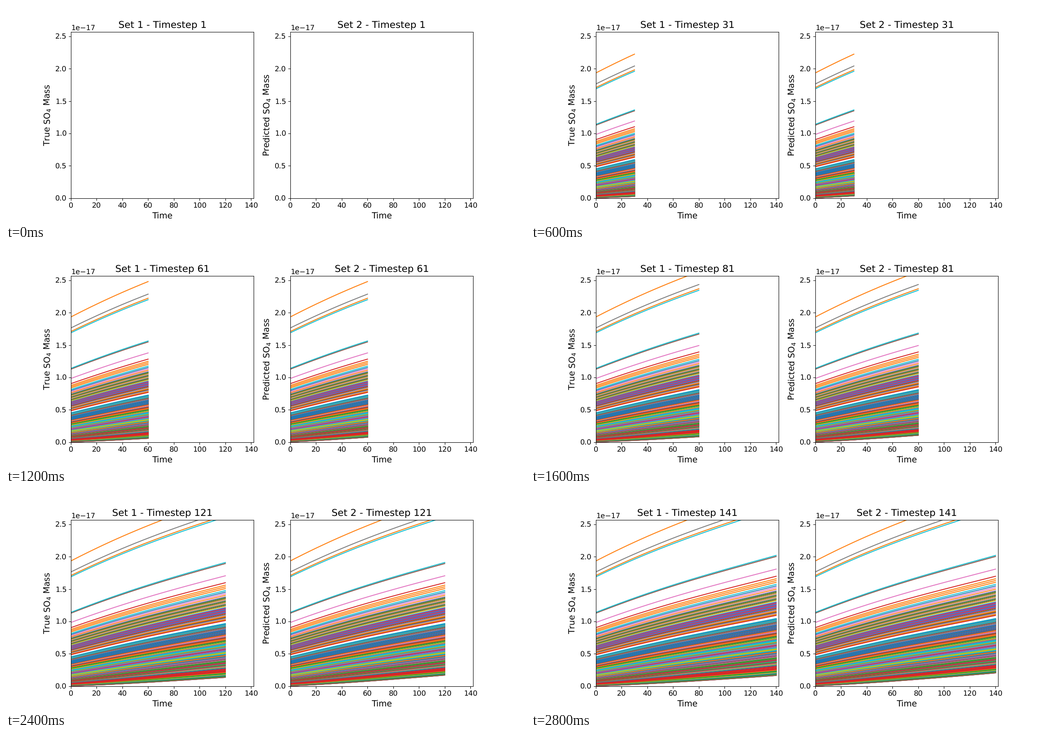
Recreate the animation shown at these times as a matplotlib script. Size 1159x483 px, loop 2.9 s.

```python
import numpy as np
import matplotlib.pyplot as plt
from matplotlib.animation import FuncAnimation
from matplotlib.collections import LineCollection

W, H, DPI = 1159, 483, 96.6
FRAMES, STEP = 29, 5
SCALE = 1e-17
P = 0.48  # mass**P grows by the same amount for every particle

plt.rcParams.update({
    "font.family": "DejaVu Sans",
    "text.hinting": "no_hinting",
    "xtick.labelsize": 12,
    "ytick.labelsize": 12,
    "axes.titlesize": 16,
    "axes.labelsize": 14,
})

# Starting masses of the few heavy particles, with their cycle colours
HEAVY = {1.935: "C1", 1.765: "C7", 1.71: "C1", 1.69: "C9",
         1.128: "C5", 1.141: "C9", 0.985: "C6", 0.905: "C3"}

# Evenly filled bands: heaviest, lightest, count, repeating cycle digits
BANDS = [(0.877, 0.838, 3, "1"),
         (0.815, 0.745, 5, "90614"),
         (0.735, 0.640, 11, "2586"),
         (0.625, 0.560, 11, "0434"),
         (0.550, 0.486, 12, "246813"),
         (0.455, 0.430, 5, "9097"),
         (0.045, 0.030, 4, "3"),
         (0.012, 0.006, 3, "025")]


def build_particles():
    """Dense random cloud first, then the bands and heavy ones above it."""
    rng = np.random.default_rng(7)
    cloud = rng.uniform(0.085, 0.684, 700)
    mass = list(cloud ** (1 / P))
    colors = [f"C{d}" for d in rng.integers(0, 10, cloud.size)]
    for top, bottom, count, cycle in BANDS:
        mass += list(np.linspace(top, bottom, count))
        colors += [f"C{cycle[i % len(cycle)]}" for i in range(count)]
    return np.array(mass + list(HEAVY)), colors + list(HEAVY.values())


m0, colors = build_particles()
t = np.arange(FRAMES) * STEP
growth = t * (3.505e-3 - 1.165e-5 * t + 2.7e-8 * t**2)
true = (m0[:, None] ** P + growth) ** (1 / P)
# The prediction overshoots only for the lightest particles
pred = true + 0.045 * np.exp(-m0 / 0.05)[:, None] * t / t[-1]

# The tiny margin keeps the pixel size from rounding down
fig, axes = plt.subplots(1, 2, dpi=DPI,
                         figsize=((W + 1e-4) / DPI, (H + 1e-4) / DPI))


def make_panel(ax, name):
    ax.set_xlim(0, 142)
    ax.set_ylim(0, 2.569 * SCALE)
    ax.set_xlabel("Time")
    ax.set_ylabel(f"{name} SO$_4$ Mass")
    lines = LineCollection([], colors=colors, linewidths=1.5,
                           capstyle="projecting", joinstyle="round", zorder=2)
    ax.add_collection(lines, autolim=False)
    return lines


def make_paths(mass):
    return np.stack([np.broadcast_to(t, mass.shape), mass * SCALE], axis=-1)


panels = [(ax, make_panel(ax, name), make_paths(mass))
          for ax, name, mass in zip(axes, ("True", "Predicted"), (true, pred))]


def update(i):
    for k, (ax, lines, paths) in enumerate(panels, 1):
        lines.set_segments(paths[:, :i + 1] if i else [])
        ax.set_title(f"Set {k} - Timestep {i * STEP + 1}")
    return []


anim = FuncAnimation(fig, update, frames=FRAMES, interval=100,
                     init_func=lambda: update(0), repeat=True, repeat_delay=0)
plt.show()
```
